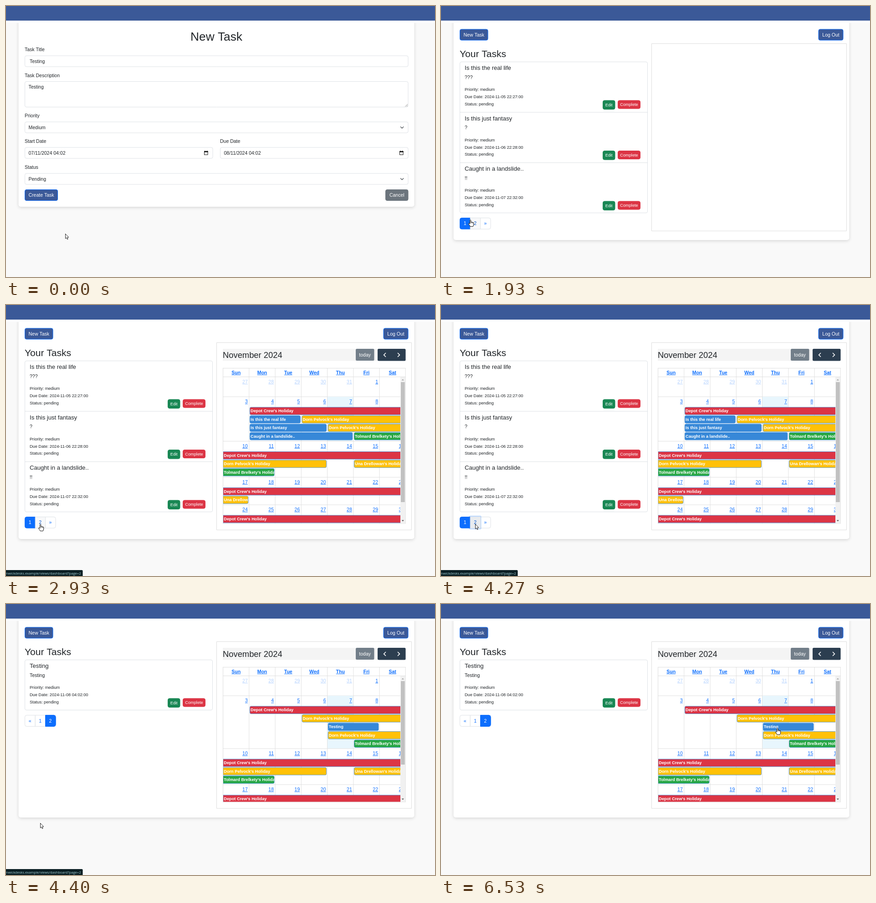
An HTML page with a canvas that plays this animation: 942x594 px, repeating every 7270 ms.

```html
<!DOCTYPE html>
<html lang="en">
<head>
<meta charset="utf-8">
<title>Task planner</title>
<style>
html, body { margin: 0; width: 100%; height: 100%; overflow: hidden; background: #f9f9f9; }
canvas { display: block; width: 942px; height: 594px; }
</style>
</head>
<body>
<canvas id="stage" width="942" height="594"></canvas>
<script>
const ctx = document.getElementById('stage').getContext('2d');
const LOOP = 7270, FPS = 15;
const SANS = '"Liberation Sans", Arial, sans-serif';
const INK = '#212529', LINE = '#dee2e6', BLUE = '#0d6efd', NAVY = '#3b5998', LINK_HOVER = '#0a58ca';
const RED = '#dc3545', YELLOW = '#ffc107', GREEN = '#28a745', EVENT = '#3788d8';

// ---------- helpers ----------
function text(s, x, mid, size = 10.5, color = INK, align = 'left', weight = '') {
  ctx.font = `${weight} ${size}px ${SANS}`;
  ctx.fillStyle = color;
  ctx.textAlign = align;
  ctx.fillText(s, x, mid + size * 0.346);
}

function box(x, y, w, h, r, fill, stroke) {
  ctx.beginPath();
  ctx.roundRect(x, y, w, h, r);
  if (fill) { ctx.fillStyle = fill; ctx.fill(); }
  if (stroke) { ctx.strokeStyle = stroke; ctx.lineWidth = 1; ctx.stroke(); }
}

function rect(x, y, w, h, fill) {
  ctx.fillStyle = fill;
  ctx.fillRect(x, y, w, h);
}

function poly(points, color, width, fill) {
  ctx.beginPath();
  points.forEach(([x, y], i) => i ? ctx.lineTo(x, y) : ctx.moveTo(x, y));
  if (fill) { ctx.closePath(); ctx.fillStyle = fill; ctx.fill(); }
  if (color) { ctx.strokeStyle = color; ctx.lineWidth = width; ctx.stroke(); }
}

function link(s, right, mid, color, size = 10.5, weight = '') {
  text(s, right, mid, size, color, 'right', weight);
  const w = ctx.measureText(s).width;
  rect(right - w, mid + 4.8, w, 0.9, color);
}

function button(s, x, y, w, h, fill, stroke, size = 10.5) {
  box(x + 0.5, y + 0.5, w - 1, h - 1, 3.5, fill, stroke || fill);
  text(s, x + w / 2, y + h / 2, size, '#fff', 'center');
}

const inside = (p, x, y, w, h) => p.x >= x && p.x <= x + w && p.y >= y && p.y <= y + h;

// ---------- page frame ----------
function frame(bottom) {
  rect(0, 0, 942, 594, '#f9f9f9');
  ctx.save();
  ctx.shadowColor = 'rgba(0,0,0,.14)';
  ctx.shadowBlur = 7;
  ctx.shadowOffsetY = 2;
  box(27.5, 30, 869, bottom - 30, 5, '#fff');
  ctx.restore();
  rect(0, 32, 942, 5, '#fff');
  rect(0, 0, 942, 32, NAVY);
}

// ---------- form ----------
const field = (x, y, w, h = 25) => box(x + 0.5, y + 0.5, w - 1, h - 1, 3.5, '#fff', LINE);

function select(label, value, mid) {
  text(label, 41, mid - 26);
  field(41, mid - 12.5, 842.5);
  text(value, 49.5, mid);
  poly([[866.2, mid - 1.6], [869.6, mid + 1.8], [873, mid - 1.6]], '#343a40', 1.2);
}

function dateField(label, value, x) {
  text(label, x, 296.5);
  field(x, 309.5, 413.5);
  text(value, x + 8.5, 322);
  const ix = x + 394;
  ctx.strokeStyle = '#111';
  ctx.lineWidth = 1;
  ctx.strokeRect(ix + 0.5, 318.5, 7.5, 7.5);
  rect(ix, 318, 8.5, 2.5, '#111');
  rect(ix + 1.5, 317, 1, 2, '#111');
  rect(ix + 6, 317, 1, 2, '#111');
}

function drawForm(n, p) {
  frame(440);
  text('New Task', 462, 67, 26.25, INK, 'center');
  text('Task Title', 41, 95);
  field(41, 108.5, 842.5);
  text('Testing', 52, 121);
  text('Task Description', 41, 152);
  field(41, 165, 842.5, 57);
  text('Testing', 49.5, 177.5);
  poly([[876.5, 220.5], [882, 215]], '#777', 0.8);
  poly([[879.5, 220.5], [882, 218]], '#777', 0.8);
  select('Priority', 'Medium', 266);
  dateField('Start Date', '07/11/2024 04:02', 41);
  dateField('Due Date', '08/11/2024 04:02', 470);
  select('Status', 'Pending', 379);

  const over = inside(p, 41, 402, 73, 25);
  const pressed = n === 19 || n === 20;
  const fill = pressed ? '#0a58ca' : over ? '#0b5ed7' : NAVY;
  button('Create Task', 41, 402, 73, 25, fill, over ? '#0a58ca' : BLUE);
  button('Cancel', 833, 402, 50.5, 25, '#6c757d');
  return over;
}

// ---------- dashboard ----------
const PAGES = [
  {
    bottom: 513, pagerY: 464,
    tasks: [
      ['Is this the real life', '???', '2024-11-05 22:27:00'],
      ['Is this just fantasy', '?', '2024-11-06 22:28:00'],
      ['Caught in a landslide..', '!!', '2024-11-07 22:32:00']
    ],
    pager: ['1', '2', '»'], active: 0, thumbEnd: 432
  },
  {
    bottom: 468, pagerY: 243.3,
    tasks: [['Testing', 'Testing', '2024-11-08 04:02:00']],
    pager: ['«', '1', '2'], active: 2, thumbEnd: 352
  }
];

const holiday = (name, color) => ({ title: name + "'s Holiday", color });
const CREW = holiday('Depot Crew', RED);
const DORN = holiday('Dorn Pelvock', YELLOW);
const TOLM = holiday('Tolmard Brelkety', GREEN);
const UNA = holiday('Una Drellowan', YELLOW);
const task = title => ({ title, color: EVENT });

// each event: [what, lane, first column, end column, starts here, ends here]
const LATER = [
  [[CREW, 0, 0, 7], [DORN, 1, 0, 4, 0, 1], [UNA, 1, 5, 7, 1], [TOLM, 2, 0, 2, 0, 1]],
  [[CREW, 0, 0, 7], [UNA, 1, 0, 1, 0, 1]],
  [[CREW, 0, 0, 7]]
];
PAGES[0].weeks = [[], [
  [CREW, 0, 1, 7, 1],
  [task('Is this the real life'), 1, 1, 3, 1, 1], [DORN, 1, 3, 7, 1],
  [task('Is this just fantasy'), 2, 1, 4, 1, 1], [DORN, 2, 4, 7, 1],
  [task('Caught in a landslide..'), 3, 1, 5, 1, 1], [TOLM, 3, 5, 7, 1]
], ...LATER];
PAGES[1].weeks = [[], [
  [CREW, 0, 1, 7, 1], [DORN, 1, 3, 7, 1], [task('Testing'), 2, 4, 6, 1, 1],
  [DORN, 3, 4, 7, 1], [TOLM, 4, 5, 7, 1]
], ...LATER];

const colX = i => 476.5 + 57.25 * i;

function drawTask([title, note, due], i) {
  const y = 122 + 110.5 * i;
  if (i) rect(41, y, 413, 1, LINE);
  text(title, 52, y + 13.7, 13.1);
  text(note, 52, y + 34.3);
  ['Priority: medium', 'Due Date: ' + due, 'Status: pending']
    .forEach((s, k) => text(s, 52, y + 61.2 + 15.8 * k, 9.19));
  button('Edit', 355, y + 84.5, 27.5, 20.5, '#198754', null, 9.19);
  button('Complete', 388, y + 84.5, 50, 19, RED, null, 9.19);
}

function drawPager(page, focus, p) {
  const xs = [41, 63.7, 86, 108.5], y = page.pagerY, h = 25.5;
  let over = false;
  const cell = i => {
    const x = xs[i], w = xs[i + 1] - x, on = i === page.active;
    const hit = inside(p, x, y, w, h);
    const focused = focus && i === 1;
    if (focused) {
      box(x - 2.5, y - 2.3, w + 5, h + 4.6, 2, `rgba(13,110,253,${0.25 * focus})`);
    }
    over = over || hit;
    const r = i === 0 ? [4, 0, 0, 4] : i === 2 ? [0, 4, 4, 0] : 0;
    const fill = on ? BLUE : focused ? '#e9ecef' : hit ? '#f8f9fa' : '#fff';
    box(x + 0.5, y + 0.5, w, h - 1, r, fill, on ? BLUE : LINE);
    text(page.pager[i], x + w / 2 + 0.2, y + h / 2, 10.5, on ? '#fff' : hit ? LINK_HOVER : BLUE, 'center');
  };
  [0, 2, 1].forEach(cell);
  if (page.active === 2) cell(2);
  return over;
}

function drawEvent([what, lane, from, to, starts, ends], top, p) {
  const x = colX(from) + (starts ? 1.5 : 0);
  const right = ends ? colX(to) - 1.7 : colX(to);
  const y = top + 22.9 + 18.45 * lane, h = 16.8, w = right - x;
  const a = starts ? 2.5 : 0, b = ends ? 2.5 : 0;
  ctx.save();
  box(x + 0.3, y + 0.2, w - 0.6, h - 0.4, [a, b, b, a], what.color);
  ctx.strokeStyle = EVENT;
  ctx.lineWidth = 0.8;
  ctx.stroke();
  ctx.clip();
  text(what.title, x + 1.8, y + h / 2, 9.2, '#fff', 'left', 'bold');
  ctx.restore();
  return inside(p, x, y, Math.min(right, 866) - x, h);
}

function drawCalendar(page, p) {
  const end = page.bottom - 34;
  let over = false;
  rect(476, 96, 401.5, 26.5, '#f4f4f4');
  text('November 2024', 476, 109.3, 18.375);
  box(768, 96, 40.5, 26, 2.5, '#727e89');
  text('today', 788.2, 109, 10.5, '#fff', 'center');
  box(816, 96, 61.5, 26.5, 2.5, '#2c3e50');
  poly([[834, 105], [829.6, 109.4], [834, 113.8]], '#fff', 1.6);
  poly([[860, 105], [864.4, 109.4], [860, 113.8]], '#fff', 1.6);

  ctx.save();
  ctx.beginPath();
  ctx.rect(476, 158, 390, end - 158);
  ctx.clip();
  let top = 157.5;
  page.weeks.forEach((events, row) => {
    const lanes = events.reduce((m, e) => Math.max(m, e[1] + 1), 0);
    const h = row ? 23.6 + 18.45 * lanes : 43.5;
    if (row === 1) rect(colX(4), top, 57.25, h, '#e8f6fd');
    rect(476, top + h - 0.4, 402, 0.9, '#ddd');
    for (let i = 0; i < 7; i++) {
      rect(colX(i) - 0.4, top, 0.9, h, '#ddd');
      const day = row * 7 + i - 4;
      const old = day < 1;
      link(String(old ? day + 31 : day), colX(i + 1) - 3, top + 10.6, old ? '#b6d3fe' : BLUE);
    }
    events.forEach(e => { over = drawEvent(e, top, p) || over; });
    top += h;
  });
  ctx.restore();

  // weekday header and outer lines
  ['Sun', 'Mon', 'Tue', 'Wed', 'Thu', 'Fri', 'Sat'].forEach((d, i) => {
    ctx.font = `bold 10.5px ${SANS}`;
    const half = ctx.measureText(d).width / 2;
    link(d, colX(i) + 28.7 + half, 148, BLUE, 10.5, 'bold');
    rect(colX(i) - 0.4, 138, 0.9, 20, '#ddd');
  });
  rect(476, 138, 401.5, 0.9, '#ddd');
  rect(476, 157, 401.5, 0.9, '#ddd');
  rect(476, end - 0.5, 401.5, 0.9, '#ddd');
  rect(476, 138, 0.9, end - 138, '#ddd');

  // scrollbar
  rect(866, 158, 10.7, end - 158, '#f1f1f1');
  rect(867, 169, 8.7, page.thumbEnd - 169, '#c1c1c1');
  poly([[868.7, 165.3], [871.3, 162.6], [873.9, 165.3]], null, 0, '#a3a3a3');
  poly([[868.7, end - 7.4], [871.3, end - 4.7], [873.9, end - 7.4]], null, 0, '#505050');
  rect(876.7, 138, 0.9, end - 138, '#ddd');
  return over;
}

function drawDashboard(page, loaded, focus, p) {
  frame(page.bottom);
  button('New Task', 41, 50.5, 62.5, 25, NAVY, BLUE);
  button('Log Out', 828.5, 50.5, 55, 25, NAVY, BLUE);
  text('Your Tasks', 41, 104.3, 21);
  box(41.5, 122.5, 412, 110.5 * page.tasks.length - 0.5, 3.5, '#fff', LINE);
  page.tasks.forEach(drawTask);
  box(462.5, 82.5, 428, page.bottom - 102.5, 0, '#fff', '#ddd');
  const onPager = drawPager(page, focus, p);
  const onEvent = loaded && drawCalendar(page, p);
  return onPager || onEvent;
}

function drawStatus() {
  box(-4, 581, 172.5, 17, 2, '#0b1f24');
  ctx.font = '7.6px "Open Sans", "Noto Sans", sans-serif';
  ctx.fillStyle = '#a3cfd6';
  ctx.textAlign = 'right';
  ctx.fillText('tarnwickdesks.example/views/dashboard?page=2', 164.5, 590.6);
}

// ---------- pointer ----------
// [step, x, y]
const PATH = [
  [0, 130, 499], [6, 5, 446], [11, 56, 416], [13, 56, 416], [14, 57, 416], [27, 57, 416],
  [29, 64, 468], [32, 70, 499], [33, 70, 499], [34, 72, 502], [37, 72, 502], [44, 75, 480],
  [68, 75, 480], [79, 95, 174], [80, 96, 159], [90, 735, 243], [93, 737, 271],
  [97, 737, 271], [98, 738, 271], [110, 738, 271]
];

function pointerAt(n) {
  const i = PATH.findIndex(k => k[0] > n);
  const [n0, x0, y0] = PATH[i - 1], [n1, x1, y1] = PATH[i];
  const u = (n - n0) / (n1 - n0), e = u * u * (3 - 2 * u);
  return { x: x0 + (x1 - x0) * e, y: y0 + (y1 - y0) * e };
}

function drawPointer(p, hand) {
  ctx.save();
  ctx.translate(Math.round(p.x) + 0.5, Math.round(p.y) + 0.5);
  ctx.lineJoin = 'round';
  if (!hand) {
    poly([[0, 0], [0, 10.4], [2.3, 8.3], [4, 12], [5.6, 11.3], [4, 7.7], [7.2, 7.5], [0, 0], [0, 1]],
      '#111', 0.9, '#fff');
  } else {
    const outline = new Path2D('M-1 1Q0 -.7 1.2 1V5Q2.4 4 3.4 5.5Q4.6 4.7 5.5 6.1Q7 5.4 7.2 7.2V10.5' +
      'Q7 12.5 5.8 14.8H-.3Q-1.5 12.5-3.8 9.6Q-4.6 8-3.3 7.8Q-2 7.8-1 9.3Z');
    ctx.fillStyle = '#fff';
    ctx.fill(outline);
    ctx.strokeStyle = '#111';
    ctx.lineWidth = 1;
    ctx.stroke(outline);
    poly([[1.2, 5], [1.2, 7.6]], '#111', 0.8);
    poly([[3.4, 5.5], [3.4, 7.8]], '#111', 0.8);
    poly([[5.5, 6.1], [5.5, 8]], '#111', 0.8);
  }
  ctx.restore();
}

// ---------- timeline ----------
function draw(ms) {
  const n = Math.floor(ms * FPS / 1000 + 0.06);
  const p = pointerAt(n);
  let hand;
  if (n < 27) {
    hand = drawForm(n, p);
  } else {
    const second = n >= 65;
    const loaded = n >= 30 && n !== 65;
    const focus = n >= 58 && !second ? Math.min(1, (n - 57) / 3) : 0;
    hand = drawDashboard(PAGES[second ? 1 : 0], loaded, focus, p) && n !== 64;
  }
  if (n >= 42 && n < 73) drawStatus();
  drawPointer(p, hand);
}

const start = performance.now();
function tick() {
  draw((performance.now() - start) % LOOP);
  requestAnimationFrame(tick);
}
tick();
</script>
</body>
</html>
```
